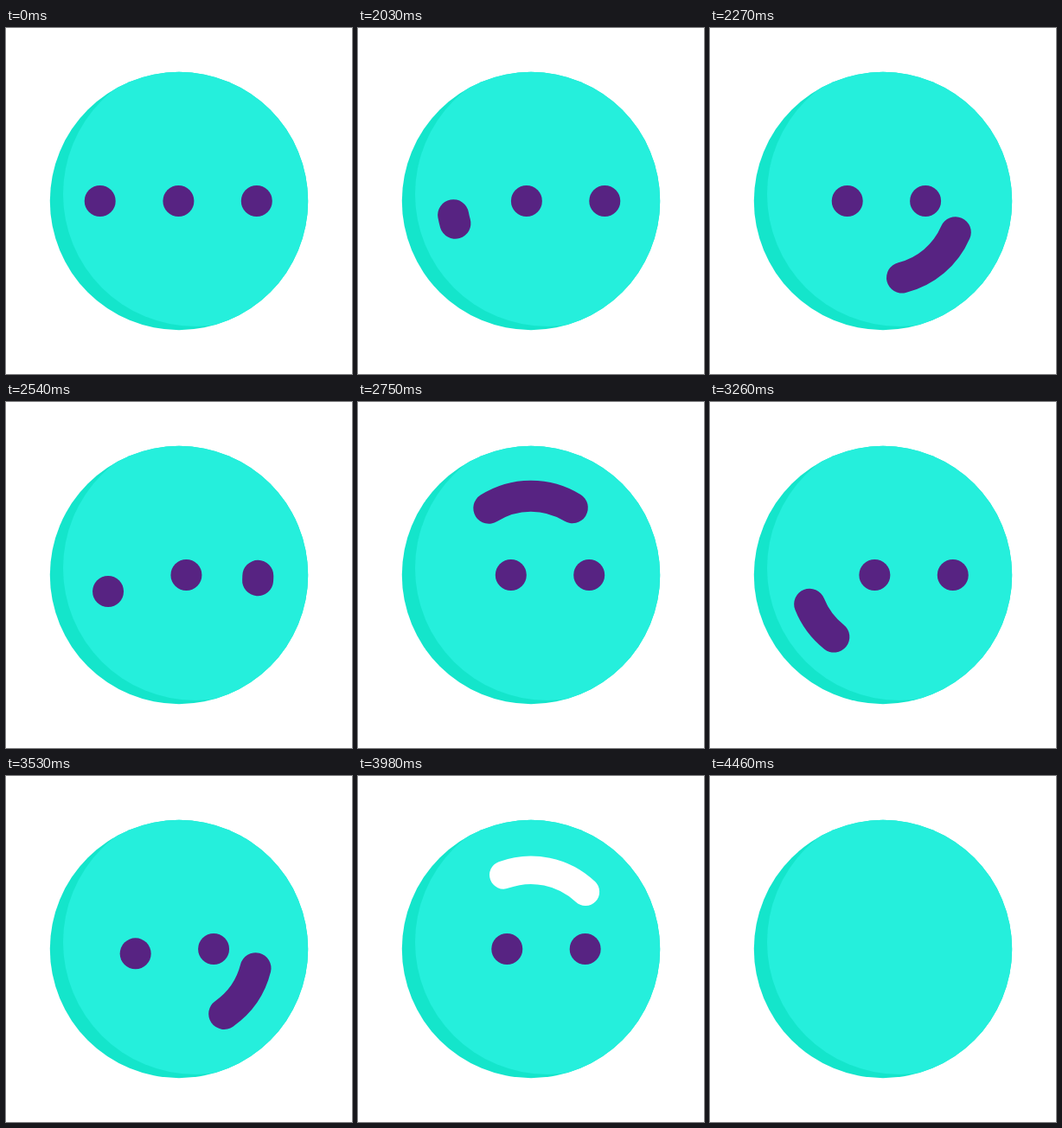
An HTML page for the animation above (4.49 s loop, 400 by 400 pixels).

```html
<!DOCTYPE html>
<html lang="en">
<head>
<meta charset="utf-8">
<title>Swinging dots</title>
<style>
  html, body { margin: 0; width: 100%; height: 100%; overflow: hidden; background: #fff; }
  svg { display: block; width: 100vw; height: 100vh; }
</style>
</head>
<body>
<svg viewBox="0 0 400 400">
  <defs>
    <clipPath id="face"><circle cx="200" cy="200" r="149.2"/></clipPath>
  </defs>
  <circle cx="200" cy="200" r="149.2" fill="#14e5cb"/>
  <circle cx="219" cy="192" r="153" fill="#25efdc" clip-path="url(#face)"/>
  <g id="dots" fill="#572382">
    <circle id="left" r="18"/>
    <circle id="right" r="18"/>
    <path id="arc" fill="none" stroke-linecap="round"/>
  </g>
</svg>
<script>
const LOOP = 4490, REST = 2000, TICK = 30, BLANK = 4460;
const STEPS = 20, SWINGS = 4;
const CENTER = 200, RADIUS = 91.3, GAP = 90.4, FIRST = 109;
const PURPLE = '#572382';
const [dots, left, right, arc] =
  ['dots', 'left', 'right', 'arc'].map(id => document.getElementById(id));

function set(el, attrs) {
  for (const key in attrs) el.setAttribute(key, attrs[key]);
}

// Cubic easing curve, solved for x by bisection.
function bezier(x1, y1, x2, y2) {
  const at = (a, b, u) => 3 * (1 - u) ** 2 * u * a + 3 * (1 - u) * u * u * b + u ** 3;
  return x => {
    let lo = 0, hi = 1;
    for (let i = 0; i < 30; i++) {
      const mid = (lo + hi) / 2;
      if (at(x1, x2, mid) < x) lo = mid; else hi = mid;
    }
    return at(y1, y2, (lo + hi) / 2);
  };
}

const headEase = bezier(.167, .167, 0, 1);
const tailEase = bezier(.167, .167, .667, 1);

// The next dot pulls back before its own swing.
function windUp(s) {
  if (s < .5) return 0;
  if (s < .8) return 32 * (s - .5) / .3;
  return 32 * (1 - ((s - .8) / .2) ** 1.3);
}

function point(turn, side) {
  const a = Math.PI * turn;
  const x = CENTER - RADIUS * Math.cos(a);
  const y = CENTER + side * RADIUS * Math.sin(a);
  return x.toFixed(2) + ' ' + y.toFixed(2);
}

function swingPath(s, side) {
  const from = point(tailEase(s), side);
  const to = point(headEase(s), side);
  if (from === to) return `M${from}h.01`;
  return `M${from}A${RADIUS} ${RADIUS} 0 0 ${side > 0 ? 0 : 1} ${to}`;
}

function draw(ms) {
  const t = ms % LOOP;
  const step = Math.max(0, Math.floor((t - REST) / TICK));
  const done = step >= STEPS * SWINGS;
  const swing = done ? SWINGS - 1 : Math.floor(step / STEPS);
  const s = done ? 1 : step % STEPS / STEPS;
  const side = swing % 2 ? -1 : 1;
  const last = swing === SWINGS - 1;
  const x = FIRST + GAP * (1 - s);
  const white = last && !done;

  set(dots, { visibility: t >= BLANK ? 'hidden' : 'visible' });
  set(left, { cx: x, cy: CENTER + (last ? 0 : side * windUp(s)) });
  set(right, { cx: x + GAP, cy: CENTER });
  set(arc, {
    d: swingPath(s, side),
    stroke: white ? '#fff' : PURPLE,
    'stroke-width': white ? 32.5 : 36
  });
}

let start;
function frame(now) {
  if (start === undefined) start = now;
  draw(now - start);
  requestAnimationFrame(frame);
}
draw(0);
requestAnimationFrame(frame);
</script>
</body>
</html>
```
